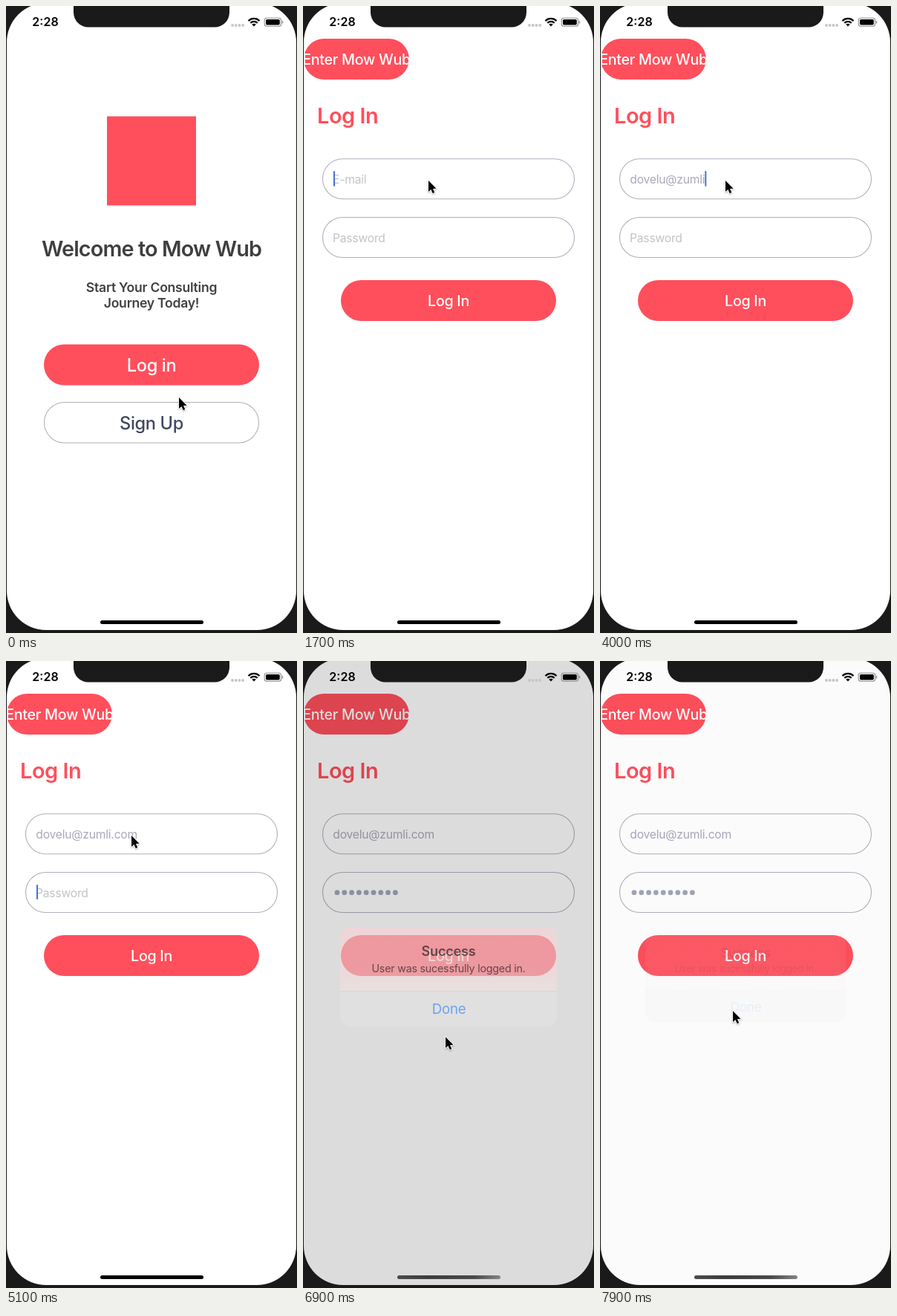
Write an HTML page with a canvas that moves like this. It is 392x844 px and loops after 8000 ms.

```html
<!DOCTYPE html>
<html lang="en">
<head>
<meta charset="utf-8">
<title>Log in flow</title>
<style>
html, body { margin: 0; width: 100%; height: 100%; overflow: hidden; background: #1a1a1a; }
canvas { display: block; width: 392px; height: 844px; }
</style>
</head>
<body>
<canvas id="stage"></canvas>
<script>
const W = 392, H = 844, LOOP = 8000;
const CORAL = '#ff4f5c', BODY = '#1a1a1a', FONT = 'Inter, Roboto, sans-serif';
const BRAND = 'Mow Wub', EMAIL = 'dovelu@zumli.com', NAME_LENGTH = 6, SECRET_LENGTH = 9;
const PUSH_AT = 288, FOCUS_AT = 1500, TAB_AT = 4800, ALERT_AT = 6790, DISMISS_AT = 7710;

const canvas = document.getElementById('stage');
const ctx = canvas.getContext('2d');
const dpr = window.devicePixelRatio || 1;
canvas.width = W * dpr;
canvas.height = H * dpr;

const clamp = (v, lo = 0, hi = 1) => Math.min(hi, Math.max(lo, v));
const mix = (a, b, k) => a + (b - a) * k;
const smooth = k => k * k * (3 - 2 * k);

// Critically damped spring from 0 to 1.
function spring(ms, omega) {
  const x = Math.max(0, ms) / 1000 * omega;
  return 1 - Math.exp(-x) * (1 + x);
}

// Characters typed between two times.
const typed = (t, from, to, count) =>
  t < from ? 0 : clamp(1 + Math.floor((t - from) / (to - from) * (count - 1)), 0, count);

function pill(x, y, w, h, r, fill, stroke) {
  ctx.beginPath();
  ctx.roundRect(x, y, w, h, r);
  if (fill) { ctx.fillStyle = fill; ctx.fill(); }
  if (stroke) { ctx.strokeStyle = stroke; ctx.lineWidth = 1.1; ctx.stroke(); }
}

function text(str, x, y, size, color, weight = 400, align = 'center', track = -0.015) {
  ctx.font = `${weight} ${size}px ${FONT}`;
  ctx.letterSpacing = size * track + 'px';
  ctx.textAlign = align;
  ctx.fillStyle = color;
  ctx.fillText(str, x, y);
}

function dot(x, y, r, color) {
  ctx.fillStyle = color;
  ctx.beginPath();
  ctx.arc(x, y, r, 0, Math.PI * 2);
  ctx.fill();
}

function welcome() {
  ctx.fillStyle = '#fff';
  ctx.fillRect(0, 0, W, H);
  ctx.fillStyle = CORAL;
  ctx.fillRect(136, 148.5, 120, 120);
  text('Welcome to ' + BRAND, 196, 337, 28.8, '#3f3f3f', 600, 'center', -0.03);
  text('Start Your Consulting', 196, 384.5, 17.6, '#404040', 600);
  text('Journey Today!', 196, 405.5, 17.6, '#404040', 600);
  pill(51, 455.5, 290, 55, 27.5, CORAL);
  text('Log in', 196, 491.5, 23.6, '#fff', 500);
  pill(51.5, 533.5, 289, 54.5, 27.25, '#fff', '#b2b2b8');
  text('Sign Up', 196, 569.5, 23.6, '#42465f', 500);
}

function caret(x, y, h) {
  pill(x, y, 2, h, 1, '#4a70d0');
}

function login(t) {
  ctx.fillStyle = '#fff';
  ctx.fillRect(0, 0, W, H);
  pill(1, 44, 142, 55, 27.5, CORAL);
  text('Enter ' + BRAND, 72, 79, 19.7, '#fff', 500);
  text('Log In', 19, 157.5, 29, CORAL, 600, 'left', -0.018);
  pill(26.5, 205.8, 339, 54, 27, null, '#b0b0be');
  pill(26.5, 284.5, 339, 54, 27, null, '#b0b0be');

  const count = t < 3000
    ? typed(t, 1950, 2700, NAME_LENGTH)
    : NAME_LENGTH + typed(t, 3150, 4500, EMAIL.length - NAME_LENGTH);
  const entry = EMAIL.slice(0, count);
  if (count) text(entry, 40.3, 238.5, 15.7, '#a8a9bc', 400, 'left');
  else text('E-mail', 40, 238.5, 15.7, '#c3c3c6', 400, 'left');
  if (t >= FOCUS_AT && t < TAB_AT) {
    caret(count ? 40.3 + ctx.measureText(entry).width : 41, 222, 21);
  }

  const marks = typed(t, 5300, 6200, SECRET_LENGTH);
  if (!marks) text('Password', 40, 317.5, 15.7, '#c3c3c6', 400, 'left');
  for (let i = 0; i < marks; i++) dot(46 + i * 9.8, 311.7, 3.4, '#a1a6b8');
  if (t >= TAB_AT && t < 6600) caret(marks ? 42 + marks * 9.8 : 41, 301, 20);

  pill(51, 369, 290, 55, 27.5, CORAL);
  text('Log In', 196, 403.7, 19.7, '#fff', 500);
}

function alertBox(shown, alpha) {
  const scale = 1 + 0.2 * (1 - shown);
  const row = Math.round(mix(250, 213, shown));
  ctx.save();
  ctx.globalAlpha = alpha;
  ctx.translate(196, 425);
  ctx.scale(scale, scale);
  ctx.translate(-196, -425);
  ctx.save();
  ctx.beginPath();
  ctx.roundRect(61, 363, 270, 124, 13.5);
  ctx.clip();
  const top = ctx.createLinearGradient(0, 363, 0, 443);
  top.addColorStop(0, '#fbd0d5');
  top.addColorStop(0.6, '#f9d3d7');
  top.addColorStop(1, '#f0e2e2');
  ctx.fillStyle = top;
  ctx.fillRect(61, 363, 270, 80);
  ctx.fillStyle = `rgb(${row},${row},${row})`;
  ctx.fillRect(61, 443, 270, 44);
  ctx.fillStyle = '#c6c2c4';
  ctx.fillRect(61, 442.7, 270, 0.7);
  ctx.restore();
  text('Success', 196, 399, 16.8, '#0a0a0a', 600);
  text('User was sucessfully logged in.', 196, 419, 13.2, '#0a0a0a');
  text('Done', 196.5, 471.5, 17.3, '#157cf8');
  ctx.restore();
}

function statusBar() {
  text('2:28', 53, 27.3, 16, '#000', 600, 'center', 0);
  for (let i = 0; i < 4; i++) dot(305 + i * 4.7, 26, 1.9, '#c5c5c7');
  // Wi-Fi fan
  ctx.save();
  ctx.beginPath();
  ctx.moveTo(334, 27.6);
  ctx.lineTo(323.4, 17);
  ctx.lineTo(323.4, 12);
  ctx.lineTo(344.6, 12);
  ctx.lineTo(344.6, 17);
  ctx.closePath();
  ctx.clip();
  ctx.strokeStyle = '#000';
  ctx.lineWidth = 2.3;
  for (const r of [6.5, 10.5]) {
    ctx.beginPath();
    ctx.arc(334, 27.4, r, Math.PI, 0);
    ctx.stroke();
  }
  dot(334, 27.4, 3.6, '#000');
  ctx.restore();
  // Battery
  pill(348.2, 16.2, 22.4, 11, 3, null, '#8d8d8f');
  pill(350, 18, 18.8, 7.4, 1.6, '#000');
  pill(371.8, 19.8, 1.4, 4, 0.7, '#8d8d8f');
}

function homeBar(faded) {
  let fill = '#000';
  if (faded) {
    fill = ctx.createLinearGradient(127, 0, 266, 0);
    fill.addColorStop(0, '#4c4c4c');
    fill.addColorStop(0.3, '#3c3c3c');
    fill.addColorStop(0.75, '#4a4a4a');
    fill.addColorStop(1, '#858585');
  }
  pill(127, 827, 139, 5, 2.5, fill);
}

// Time, x, y of the pointer tip.
const path = [
  [0, 233, 527], [220, 224, 488], [330, 221, 480], [700, 173, 309],
  [950, 172, 300], [1400, 169, 235], [5900, 169, 235], [6400, 194, 402],
  [6620, 194, 406], [6900, 192, 506], [7150, 190, 500], [7550, 182, 467],
  [7700, 182, 467], [7900, 179, 471], [8000, 178, 472]
];

function pointer(t) {
  let i = 0;
  while (i < path.length - 2 && t >= path[i + 1][0]) i++;
  const [a, b] = [path[i], path[i + 1]];
  const k = smooth(clamp((t - a[0]) / (b[0] - a[0])));
  ctx.save();
  ctx.translate(mix(a[1], b[1], k), mix(a[2], b[2], k));
  ctx.beginPath();
  [[0, 0], [0, 15], [3.4, 11.9], [5.8, 17.2], [8.3, 16.1], [6, 11], [10.6, 10.8]]
    .forEach(([x, y]) => ctx.lineTo(x, y));
  ctx.closePath();
  ctx.shadowColor = 'rgba(0,0,0,.3)';
  ctx.shadowBlur = 2 * dpr;
  ctx.shadowOffsetY = dpr;
  ctx.strokeStyle = '#fff';
  ctx.lineWidth = 2;
  ctx.lineJoin = 'round';
  ctx.stroke();
  ctx.shadowColor = 'transparent';
  ctx.fillStyle = '#000';
  ctx.fill();
  ctx.restore();
}

function draw(t) {
  ctx.setTransform(dpr, 0, 0, dpr, 0, 0);
  ctx.fillStyle = BODY;
  ctx.fillRect(0, 0, W, H);

  ctx.save();
  ctx.beginPath();
  ctx.roundRect(1, -4, 390, 844, 53);
  ctx.clip();

  const push = spring(t - PUSH_AT, 13);
  if (push < 0.999) {
    ctx.save();
    ctx.translate(-117 * push, 0);
    welcome();
    ctx.restore();
    ctx.fillStyle = `rgba(0,0,0,${0.11 * push})`;
    ctx.fillRect(0, 0, W, H);
  }
  if (push > 0) {
    ctx.save();
    ctx.translate(390 * (1 - push), 0);
    // Keep the outgoing screen visible left of the incoming one.
    ctx.beginPath();
    ctx.rect(1, 0, W, H);
    ctx.clip();
    login(t);
    ctx.restore();
  }

  const shown = spring(t - ALERT_AT, 18);
  const left = clamp((t - DISMISS_AT) / 230);
  const alpha = shown * (1 - smooth(left));
  if (alpha > 0) {
    ctx.fillStyle = `rgba(0,0,0,${0.228 * alpha})`;
    ctx.fillRect(0, 0, W, H);
    alertBox(shown, alpha);
  }

  statusBar();
  homeBar(t >= ALERT_AT);
  ctx.restore();

  pill(91, -30, 210, 58.5, 20, BODY);
  pointer(t);
}

const start = performance.now();
function tick() {
  draw((performance.now() - start) % LOOP);
  requestAnimationFrame(tick);
}
draw(0);
requestAnimationFrame(tick);
</script>
</body>
</html>
```
